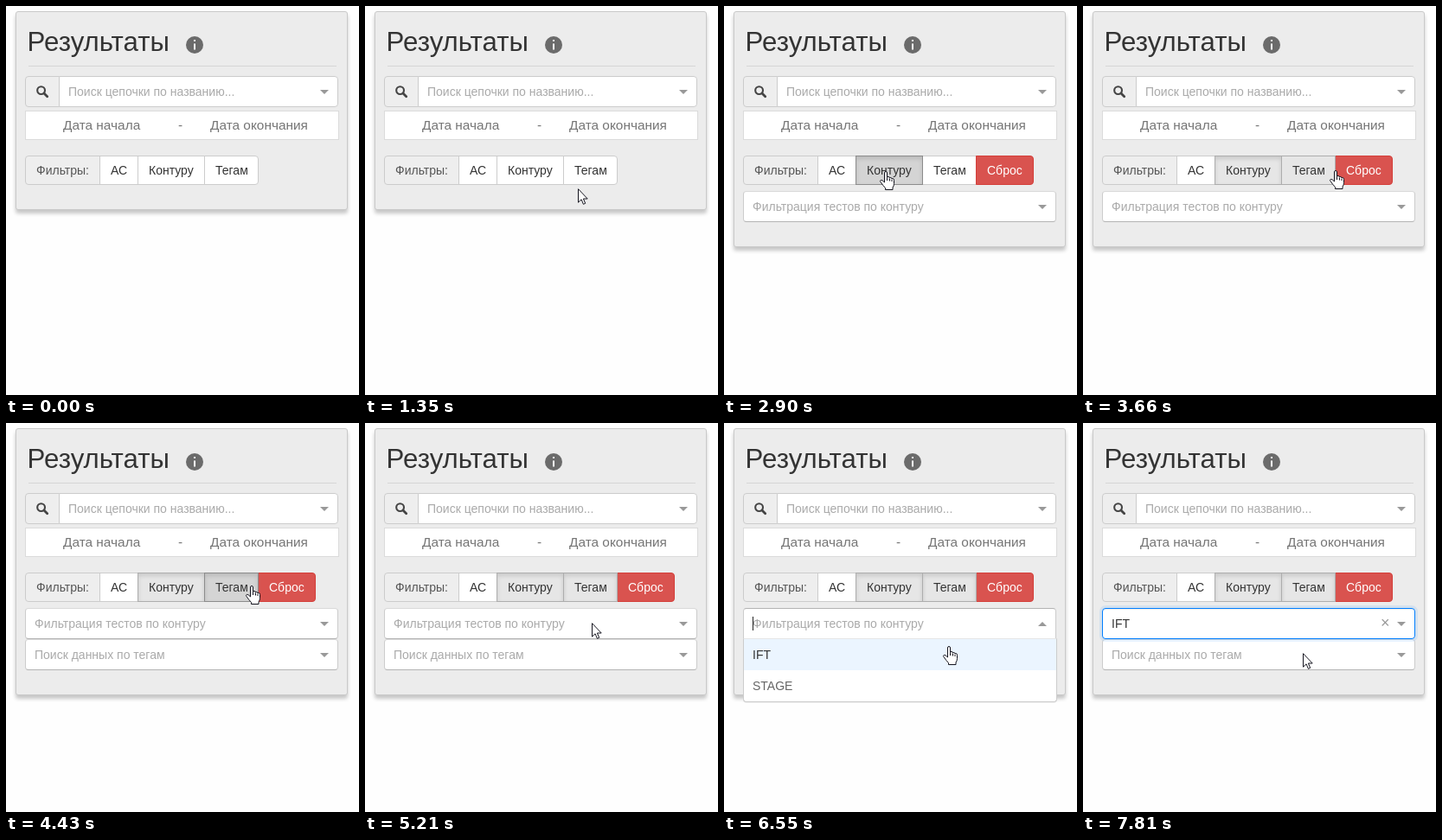
An HTML page for the animation above (8 s loop, 408 by 450 pixels).

```html
<!DOCTYPE html>
<html lang="ru">
<head>
<meta charset="utf-8">
<title>Результаты</title>
<style>
html, body { margin: 0; width: 100%; height: 100%; overflow: hidden; background: #fefefe; }
body { position: relative; font: 14px "Liberation Sans", Arial, sans-serif; color: #333; }
div, svg { position: absolute; box-sizing: border-box; white-space: pre; }
svg { left: 0; top: 0; width: 408px; height: 450px; }
.panel { background: #ececec; border: 1px solid #c9c9c9; border-radius: 3px; box-shadow: 0 4px 4px rgba(0,0,0,.22); }
.title { font-size: 31.2px; line-height: 36px; }
.rule { background: #d6d6d6; }
.addon { background: #eee; border: 1px solid #ccc; border-radius: 4px 0 0 4px; color: #555; line-height: 32px; padding-left: 12px; }
.dates { background: #fff; border: 1px solid #dbdbdb; }
.date { font-size: 15.4px; line-height: 32px; color: #757575; }
.btn { background: #fff; border: 1px solid #ccc; line-height: 32px; padding-left: 12px; }
.btn.hover, .btn.on { background: #e6e6e6; border-color: #adadad; z-index: 2; }
.btn.on { box-shadow: inset 0 3px 5px rgba(0,0,0,.125); }
.btn.on.hover { background: #d4d4d4; border-color: #8c8c8c; }
.end { border-radius: 0 4px 4px 0; }
.reset { background: #d9534f; border-color: #d43f3a; color: #fff; }
.select { background: #fff; border: 1px solid; border-color: #d9d9d9 #ccc #b3b3b3; border-radius: 4px; color: #aaa; line-height: 34px; padding-left: 10px; }
.search { border-color: #ccc; border-radius: 0 4px 4px 0; }
.select.open { border-color: #b3b3b3 #ccc #d9d9d9; border-radius: 4px 4px 0 0; }
.select.focus { border-color: #007eff; color: #333; box-shadow: inset 0 1px 1px rgba(0,0,0,.075), 0 0 0 3px rgba(0,126,255,.1); z-index: 1; }
.select::after { content: ""; position: absolute; right: 10px; top: 15px; border: 5px solid transparent; border-top-color: #999; border-bottom: 0; }
.select.open::after { border-top: 0; border-bottom: 5px solid #999; }
.clear { font-size: 18px; line-height: 20px; color: #999; z-index: 2; }
.menu { background: #fff; border: 1px solid #ccc; border-top-color: #e6e6e6; border-radius: 0 0 4px 4px; box-shadow: 0 1px 0 rgba(0,0,0,.06); overflow: hidden; z-index: 3; }
.option { line-height: 36px; padding-left: 10px; color: #666; }
.option.hover { background: #ebf5ff; color: #333; }
.caret { background: #222; z-index: 3; }
#cursor { z-index: 9; }
#cursor path { fill: #fff; stroke: #15151f; stroke-linejoin: round; }
#cursor .line { fill: none; }
</style>
</head>
<body>
<svg id="cursor" viewBox="0 0 408 450">
  <g id="arrow"><path d="M.5.7V16.2L4.1 12.8L6.4 18.3L8.7 17.3L6.4 12H11.2Z"/></g>
  <g id="hand">
    <path d="M5.5 13V2Q5.5.5 7 .5T8.5 2V7.5Q8.5 6.5 10 6.5T11.5 8Q11.5 7.5 12.7 7.5T14 9Q14 8.5 15.2 8.5T16.5 10.5V14.5Q16.5 17 15 19V21.5H6.5V19.5Q4 17 1 12.6Q0 10.9 1.3 10.4Q3 10 5.5 13Z"/>
    <path class="line" d="M8.5 7.5V11M11.5 8.5V11.5M14 9.5V12"/>
  </g>
  <g id="beam"><path class="line" d="M.5.5H2.5L3.5 1.5L4.5.5H6.5M3.5 1.5V14.5M.5 15.5H2.5L3.5 14.5L4.5 15.5H6.5"/></g>
</svg>
<script>
const byId = id => document.getElementById(id);

function box(cls, x, y, w, h, text = "", parent = document.body) {
  const el = document.createElement("div");
  el.className = cls;
  el.textContent = text;
  el.style.cssText = `left:${x}px;top:${y}px;width:${w}px;height:${h}px`;
  parent.append(el);
  return el;
}
const show = (el, on) => { el.style.display = on ? "" : "none"; };

const panel = box("panel", 11, 6, 384, 230);
box("title", 24.6, 24, 180, 36, "Результаты");
box("rule", 26, 69, 356, 1);
box("addon", 22, 81, 40, 36);
box("select search", 61, 81, 323, 36, "Поиск цепочки по названию...");
box("dates", 22, 121, 363, 34);
box("date", 66, 122, 100, 32, "Дата начала");
box("date", 199, 122, 10, 32, "-");
box("date", 236, 122, 130, 32, "Дата окончания");

box("addon", 22, 173, 87, 34, "Фильтры:");
const button = (x, w, text, cls = "") => box("btn " + cls, x, 173, w, 34, text);
button(108, 45, "АС");
const byContour = button(152, 78, "Контуру");
const byTag = button(229, 63, "Тегам");
const reset = button(291, 67, "Сброс", "reset end");

const contour = box("select", 22, 214, 362, 36);
const tags = box("select", 22, 250, 362, 36, "Поиск данных по тегам");
const clear = box("clear", 344, 221, 12, 20, "×");
const menu = box("menu", 22, 249, 363, 74);
box("option hover", 0, 0, 361, 36, "IFT", menu);
box("option", 0, 36, 361, 36, "STAGE", menu);
const caret = box("caret", 33, 224, 1, 16);

document.body.insertAdjacentHTML("beforeend", `
<svg viewBox="0 0 408 450">
  <circle cx="218" cy="45" r="10" fill="#6b6b6b"/>
  <path d="M217 39h2v2h-2zM217 43.5h2v7h-2z" fill="#fff"/>
  <circle cx="40.6" cy="97.6" r="4.4" fill="none" stroke="#444" stroke-width="2.1"/>
  <path d="M44 101L47.7 104.7" stroke="#444" stroke-width="2.8" stroke-linecap="round"/>
</svg>`);

// Pointer moves: first step, last step, step count, end x, end y
const moves = [
  [1180, 1560, 6, 175, 208],
  [1800, 2060, 5, 185, 191],
  [3520, 3660, 3, 290, 190],
  [3940, 4000, 2, 282, 188],
  [4520, 4580, 2, 280, 192],
  [4760, 5210, 7, 262, 231],
  [6100, 6100, 1, 264, 234],
  [6340, 6550, 4, 258, 258],
  [7660, 7810, 3, 254, 266]
];

function pointer(t) {
  let x = 316, y = 214;
  for (const [from, to, steps, endX, endY] of moves) {
    if (t < from) break;
    const gap = (to - from) / (steps - 1 || 1);
    const done = t >= to ? 1 : (Math.floor((t - from) / gap) + 1) / steps;
    x += (endX - x) * done;
    y += (endY - y) * done;
  }
  return [Math.round(x), Math.round(y)];
}

const LOOP = 8000;
const hotspots = { arrow: [0, 0], hand: [5, 0], beam: [3, 8] };

function render(t) {
  const [x, y] = pointer(t);
  const visible = t >= 1180;
  const hasContour = t >= 2900, hasTags = t >= 4430;
  const open = t >= 5520 && t < 6890, picked = t >= 6890;
  const over = (left, right) => visible && y >= 173 && y < 207 && x >= left && x < right;
  const onContour = over(152, 229), onTag = over(229, 292);

  panel.style.height = (hasTags ? 309 : hasContour ? 273 : 230) + "px";
  byContour.classList.toggle("hover", onContour);
  byContour.classList.toggle("on", t >= 2770);
  byTag.classList.toggle("hover", onTag);
  byTag.classList.toggle("on", t >= 4280);
  byTag.classList.toggle("end", !hasContour);
  show(reset, hasContour);
  show(contour, hasContour);
  show(tags, hasTags);
  contour.classList.toggle("open", open);
  contour.classList.toggle("focus", picked);
  contour.textContent = picked ? "IFT" : "Фильтрация тестов по контуру";
  show(clear, picked);
  show(menu, open);
  show(caret, open && (t < 6020 || t >= 6550));

  const kind = onContour || onTag || (open && y >= 250) ? "hand" : open ? "beam" : "arrow";
  for (const name in hotspots) {
    const [dx, dy] = hotspots[name], el = byId(name);
    show(el, visible && name === kind);
    el.setAttribute("transform", `translate(${x - dx} ${y - dy})`);
  }
}

const start = performance.now();
function tick() {
  render((performance.now() - start) % LOOP);
  requestAnimationFrame(tick);
}
render(0);
requestAnimationFrame(tick);
</script>
</body>
</html>
```
